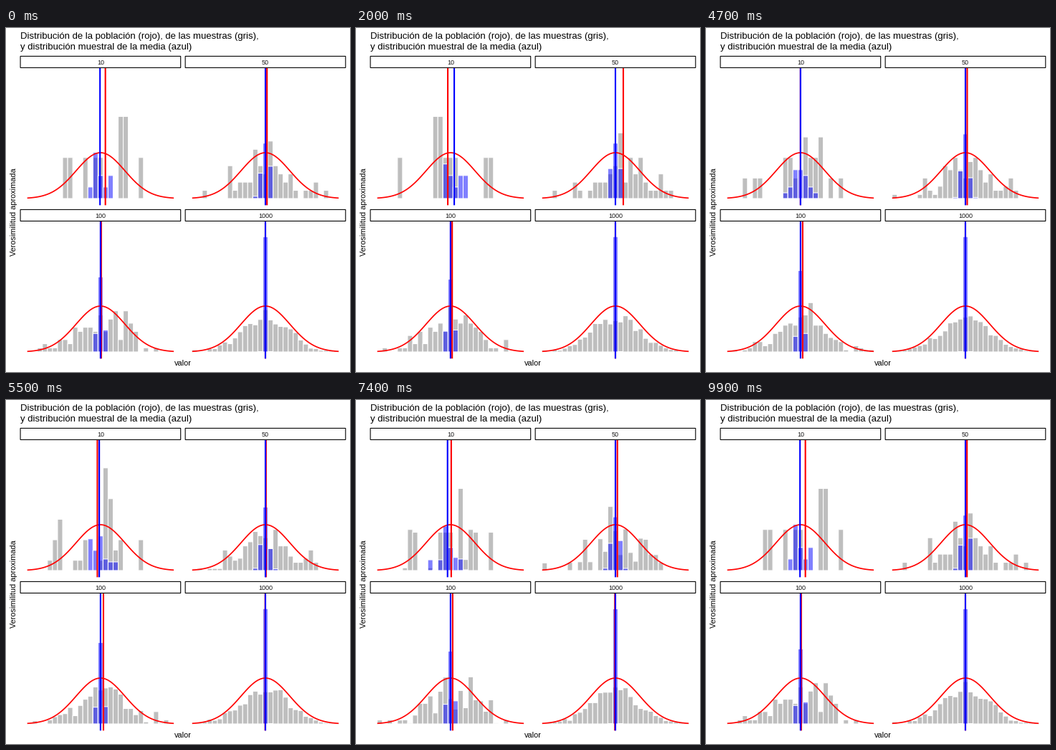
Animation, 480 px wide and 480 px high, one loop 10000 ms. Source, as a matplotlib script:

```python
import numpy as np
import matplotlib.pyplot as plt
from matplotlib.animation import FuncAnimation
from matplotlib.collections import PolyCollection
from matplotlib.patches import Rectangle

plt.rcParams["font.family"] = "Liberation Sans"
plt.rcParams["path.snap"] = False

SIZE, PX = 480, 0.75            # stage side, points per pixel at 96 dpi
HALF, BIN, SD = 102.2, 7.05, 34.05
GRAY_AREA, BLUE_AREA, PEAK = 573, 161, 64
LEFT, RIGHT, WIDTH, HEIGHT, STRIP = 19.5, 249.6, 224.75, 191.5, 17
TOPS = (38.8, 252.8)
BINS = np.arange(-14, 15)
EDGES = (np.arange(-14, 16) - 0.5) * BIN
STATES = 10
STARTS = (4, 15, 25, 35, 45, 54, 64, 74, 84, 94)
rng = np.random.default_rng(12)

# Key positions of the mean lines per state, in pixels from the centre
SAMPLE_MEAN = {
    10: (6.8, -3, -3.8, 3, 0, 0, -17.7, 1.2, -1.5, 0),
    50: (2.2, -3, 11, 4, 2.5, 2.5, -4, 3, -1, -8.5),
    100: (1, -3, 2.3, -1, 3, 3, 7.3, 3.2, 0, -0.8),
    1000: (0, 0, 0, 0, 0, 0, -1, -0.8, 0, 0),
}
GRAND_MEAN = {10: (-0.7, 2, 5.2, -2, 0, 0, -7, -4.5, 1, -6)}


def population_sample(n, mean):
    """Histogram of n random values whose average is the given mean."""
    z = rng.normal(size=n)
    x = (z - z.mean()) / z.std() * SD + mean
    return np.histogram(np.clip(x, -HALF, HALF), EDGES)[0]


def mean_sample(n, mean):
    """Histogram of n sample means, spread evenly around the given mean."""
    ranks = np.sort(rng.normal(size=(100, n)), axis=1).mean(axis=0)
    jitter = rng.normal(0, 0.3, n)
    x = (ranks + jitter - jitter.mean()) * SD / np.sqrt(n) + mean
    return np.histogram(x, EDGES)[0]


def boxes(cx, base, heights):
    x0 = cx + (BINS - 0.5) * BIN
    x1, top = x0 + BIN, base - heights
    floor = np.full(BINS.size, base)
    corners = [(x0, floor), (x0, top), (x1, top), (x1, floor)]
    return np.stack([np.column_stack(c) for c in corners], axis=1)[heights > 0.01]


fig = plt.figure(figsize=(SIZE / 96, SIZE / 96), dpi=96, facecolor="white")
ax = fig.add_axes([0, 0, 1, 1])
ax.set(xlim=(0, SIZE), ylim=(SIZE, 0))
ax.axis("off")


def label(x, y, text, size, **kw):
    ax.text(x, y, text, fontsize=size * PX, va="baseline", **kw)


class Panel:
    def __init__(self, n, left, top):
        cx = self.cx = left + WIDTH / 2
        floor = top + STRIP + HEIGHT
        self.base = floor - HEIGHT / 22 - 0.6
        red = np.array(SAMPLE_MEAN[n])
        blue = np.array(GRAND_MEAN.get(n, [0] * STATES))
        self.gray = np.array([population_sample(n, m) for m in red]) * GRAY_AREA / n
        self.blue = np.array([mean_sample(n, m) for m in blue]) * BLUE_AREA / n
        self.red_x, self.blue_x = cx + red, cx + blue

        self.gray_bars = self.bars("#bebebe", 1)
        self.blue_bars = self.bars((0, 0, 1, 0.5), 2)
        x = np.linspace(-HALF, HALF, 101)
        ax.plot(cx + x, self.base - PEAK * np.exp(-0.5 * (x / SD) ** 2),
                color="red", lw=1.7 * PX, solid_capstyle="butt", zorder=3)
        self.red_line, self.blue_line = (
            ax.plot([0, 0], [top + STRIP, floor], color=c, lw=2.13 * PX,
                    solid_capstyle="butt", zorder=z)[0]
            for c, z in (("red", 4), ("blue", 5)))
        ax.add_patch(Rectangle((left + 0.55, top + 0.6), WIDTH - 1.1,
                               STRIP - 1, fc="white", ec="black",
                               lw=1.1 * PX, zorder=6))
        label(cx, top + 12, str(n), 9, ha="center", color="#1a1a1a", zorder=7)

    def bars(self, color, z):
        return ax.add_collection(
            PolyCollection([], facecolors=[color], edgecolors="white",
                           linewidths=1.07 * PX, zorder=z), autolim=False)

    def show(self, a, b, t):
        def mix(v):
            return v[a] + (v[b] - v[a]) * t

        self.gray_bars.set_verts(boxes(self.cx, self.base, mix(self.gray)))
        self.blue_bars.set_verts(boxes(self.cx, self.base, mix(self.blue)))
        self.red_line.set_xdata([mix(self.red_x)] * 2)
        self.blue_line.set_xdata([mix(self.blue_x)] * 2)


spots = [(x, y) for y in TOPS for x in (LEFT, RIGHT)]
panels = [Panel(n, *spot) for n, spot in zip(SAMPLE_MEAN, spots)]

label(LEFT, 15.5, "Distribución de la población (rojo), de las muestras (gris),",
      13.1)
label(LEFT, 29.7, "y distribución muestral de la media (azul)", 13.1)
label(247, 471.3, "valor", 11, ha="center")
label(13.7, 257, "Verosimilitud aproximada", 10.85, ha="center", rotation=90,
      rotation_mode="anchor")


def pose(frame):
    """Current state, next state and eased progress between them."""
    k = max((i for i, s in enumerate(STARTS) if frame >= s), default=None)
    if k is None:
        return 0, 0, 0
    steps = 7 if k == 0 else 6
    t = min((frame - STARTS[k] + 1) / steps, 1)
    return k, (k + 1) % STATES, (1 - np.cos(np.pi * t)) / 2


def update(frame):
    for p in panels:
        p.show(*pose(frame))


anim = FuncAnimation(fig, update, frames=100, interval=100, repeat=True,
                     repeat_delay=0, init_func=lambda: update(0), blit=False)
plt.show()
```
